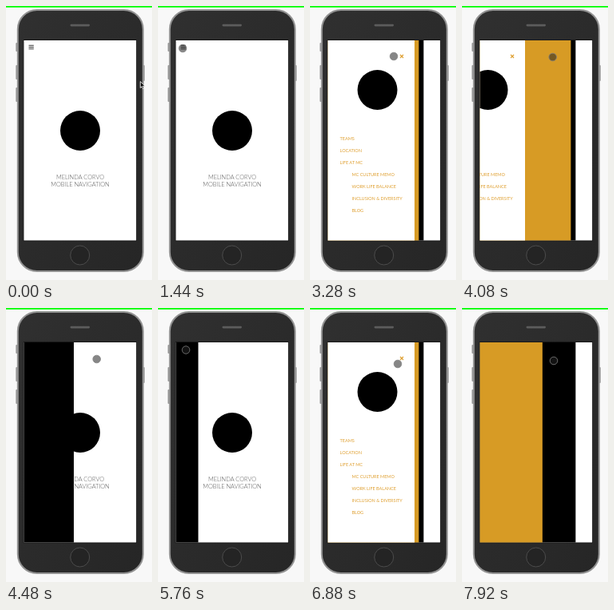
These frames come from a looping animation (183x343 px, 8000 ms). An HTML page:

```html
<!DOCTYPE html>
<html lang="en">
<head>
<meta charset="utf-8">
<title>Mobile navigation</title>
<style>
html, body { margin: 0; width: 100%; height: 100%; overflow: hidden; background: #f8f8f8; }
svg { display: block; width: 100vw; height: 100vh; }
text { font-family: Lato, sans-serif; }
.title { font-size: 7.4px; font-weight: 300; fill: #555; text-anchor: middle; }
.menu { font-size: 5.5px; fill: #dfa032; }
</style>
</head>
<body>
<svg viewBox="0 0 183 343" preserveAspectRatio="none">
  <defs>
    <clipPath id="screen"><rect x="22.4" y="43" width="140.8" height="250.6"/></clipPath>
    <linearGradient id="body" x2="1" y2="1">
      <stop stop-color="#303030"/><stop offset="1" stop-color="#262626"/>
    </linearGradient>
  </defs>
  <rect width="183" height="343" fill="#f8f8f8"/>
  <rect width="183" height="1.8" fill="#0f0"/>

  <!-- Phone -->
  <g fill="#999">
    <rect x="12.3" y="46" width="3" height="11" rx="1"/>
    <rect x="12.3" y="74" width="3" height="18" rx="1"/>
    <rect x="12.3" y="102" width="3" height="18" rx="1"/>
    <rect x="170.8" y="74" width="3" height="20" rx="1"/>
  </g>
  <rect x="14.8" y="5" width="157" height="327" rx="24" fill="url(#body)" stroke="#929292" stroke-width="2"/>
  <rect x="80.5" y="22.8" width="24.5" height="2.6" rx="1.3" fill="#5c5c5c"/>
  <circle cx="92.7" cy="312" r="12" fill="#242424" stroke="#4c4c4c"/>
  <rect x="21.8" y="42.4" width="142" height="251.8" fill="#0c0c0c"/>

  <g clip-path="url(#screen)">
    <rect x="22" y="43" width="142" height="251" fill="#fff"/>
    <path d="M28.5 49.3h6.3m-6.3 2.2h6.3m-6.3 2.2h6.3" stroke="#333"/>
    <circle cx="93" cy="156" r="25"/>
    <g class="title">
      <text x="93" y="217.3">MELINDA CORVO</text>
      <text x="93" y="226.2">MOBILE NAVIGATION</text>
    </g>
    <g id="black">
      <rect x="22" y="43" width="120.4" height="251"/>
      <g id="gold">
        <rect x="22" y="43" width="114.4" height="251" fill="#d79b25"/>
        <g id="white">
          <rect x="22" y="43" width="109" height="251" fill="#fff"/>
          <path d="M113 61l4 4m0-4l-4 4" stroke="#dfa032" stroke-width="1.2"/>
          <circle cx="84.5" cy="105" r="25"/>
          <g class="menu" id="menu"></g>
        </g>
      </g>
    </g>
  </g>

  <path id="arrow" d="M0 0v8l1.9-1.7 1.3 2.8 1.4-.6-1.3-2.8h2.6z" fill="#111" stroke="#fff" stroke-width=".8"/>
  <circle id="touch" r="4.8" fill="#222" fill-opacity=".55" stroke="#808080" stroke-opacity=".8"/>
</svg>
<script>
const $ = id => document.getElementById(id);
const LOOP = 8000;
const CLICKS = [[1560, true], [3935, false], [5660, true], [7605, false]];
// name, width, delay when opening, delay when closing
const LAYERS = [["black", 120.4, 0, 400], ["gold", 114.4, 200, 200], ["white", 109, 400, 0]];
// time, x, y of the pointer
const PATH = [
  [60, 168.3, 94.5], [240, 157, 71], [320, 157, 71], [400, 36, 53], [900, 36, 53],
  [1440, 31, 53], [2300, 31, 53], [3280, 105, 63], [3700, 113.7, 64], [4600, 113.7, 64],
  [5500, 35, 52.5], [6050, 35, 52.5], [6880, 110, 70], [7400, 115, 66], [LOOP, 115, 66]
];

["TEAMS", "LOCATION", "LIFE AT MC", "MC CULTURE MEMO", "WORK LIFE BALANCE",
  "INCLUSION & DIVERSITY", "BLOG"].forEach((label, i) => {
  const t = document.createElementNS("http://www.w3.org/2000/svg", "text");
  t.setAttribute("x", i < 3 ? 37.5 : 52.5);
  t.setAttribute("y", 168 + i * 15);
  t.textContent = label;
  $("menu").append(t);
});

const clamp = v => Math.min(1, Math.max(0, v));
const move = (id, x, y) => $(id).setAttribute("transform", `translate(${x} ${y})`);

// cubic-bezier(.42, 0, .58, 1)
function ease(x) {
  let lo = 0, hi = 1;
  for (let i = 0; i < 20; i++) {
    const s = (lo + hi) / 2;
    const bx = 3 * s * (1 - s) * (.42 * (1 - s) + .58 * s) + s ** 3;
    if (bx < x) lo = s; else hi = s;
  }
  return lo * lo * (3 - 2 * lo);
}

function pointer(t) {
  const i = PATH.findIndex(p => p[0] > t);
  if (i < 1) return PATH[0].slice(1);
  const [t0, x0, y0] = PATH[i - 1], [t1, x1, y1] = PATH[i];
  const k = ease((t - t0) / (t1 - t0));
  return [x0 + (x1 - x0) * k, y0 + (y1 - y0) * k];
}

function draw(t) {
  const [start, open] = CLICKS.filter(c => c[0] <= t).pop() || [-LOOP, false];
  for (const [id, width, openDelay, closeDelay] of LAYERS) {
    const k = ease(clamp((t - start - (open ? openDelay : closeDelay)) / 300));
    move(id, -width * (open ? 1 - k : k), 0);
  }
  const [x, y] = pointer(t);
  const outside = x > 163;
  move("arrow", x, y);
  move("touch", x, y);
  $("arrow").style.display = outside ? "" : "none";
  $("touch").style.display = outside ? "none" : "";
}

function tick() {
  draw(performance.now() % LOOP);
  requestAnimationFrame(tick);
}
tick();
</script>
</body>
</html>
```
